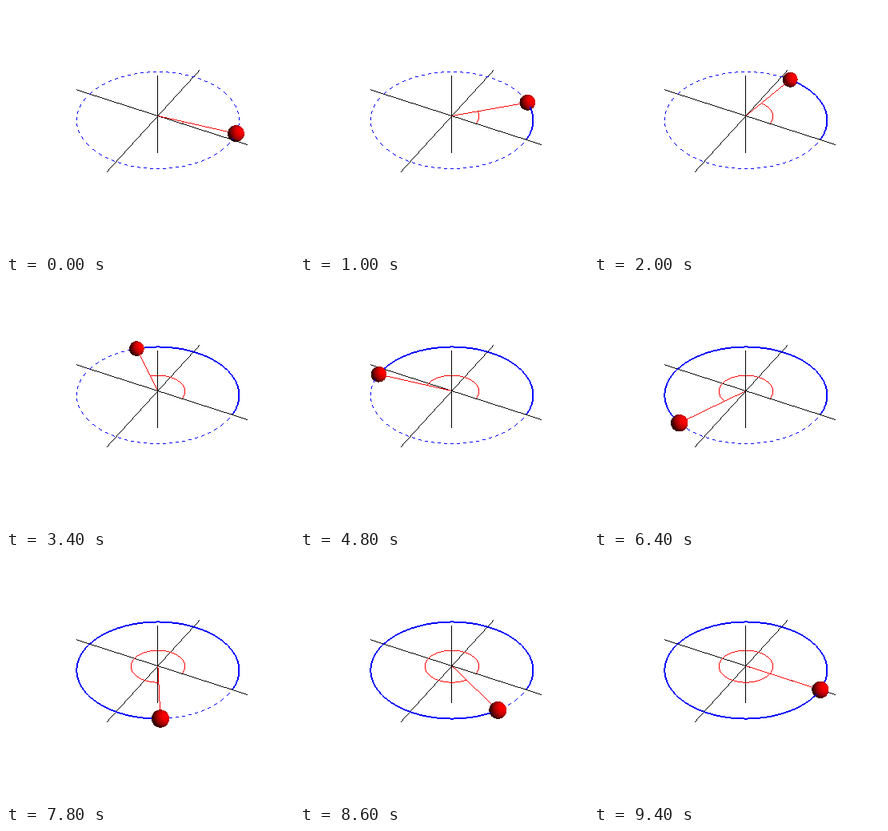
Write a matplotlib script that moves like this. It is 360 px wide and 309 px high and loops after 9.6 s.

```python
import numpy as np
import matplotlib.pyplot as plt
from matplotlib.animation import FuncAnimation

W, H, DPI = 360, 309, 100
STEPS, INTERVAL = 48, 200
BLACK, BLUE, RED = (0, 0, 0), (0, 0, 255), (255, 0, 0)

# Perspective camera; lengths are in units of the orbit radius.
CX, CY, SCALE = 189.4, 137.0, 101.1
AZIM = np.radians(28.4)
SIN_E, COS_E = 0.5936, 0.8048
PERSP = 0.113
CAMERA = np.array([0, 0, -1 / PERSP])
BALL_R = 0.1
LIGHT = np.array([0.58, 0.3, 0.757])
AMBIENT = 0.22
DASH, PERIOD = 4, 8


def view(x, y, z):
    """World point to (right, up, depth)."""
    right = x * np.cos(AZIM) + y * np.sin(AZIM)
    away = y * np.cos(AZIM) - x * np.sin(AZIM)
    return np.stack([right, away * SIN_E + z * COS_E,
                     away * COS_E - z * SIN_E], axis=-1)


def project(v):
    s = SCALE / (1 + PERSP * v[..., 2])
    return CX + s * v[..., 0], CY - s * v[..., 1]


def segment(a, b, n=2400):
    t = np.linspace(0, 1, n)[:, None]
    return view(*(np.array(a) * (1 - t) + np.array(b) * t).T)


def arc(radius, end, n=6000):
    t = np.linspace(0, end, int(n * end / (2 * np.pi)))
    return view(radius * np.cos(t), radius * np.sin(t), 0 * t)


def hidden(v, ball):
    """True where the ball blocks the sight line to a point."""
    d, f = v - CAMERA, CAMERA - ball
    a, b = (d * d).sum(-1), d @ f
    disc = b * b - a * (f @ f - BALL_R ** 2)
    return (disc > 0) & (-b - np.sqrt(np.maximum(disc, 0)) < a)


def stroke(canvas, path, color, ball, width=1, dashed=False):
    """Draw a crisp line: one step per pixel along its major direction."""
    x, y = project(path)
    flat = np.abs(np.diff(x)) >= np.abs(np.diff(y))
    major = np.where(flat, x[1:], y[1:])
    before = np.where(flat, x[:-1], y[:-1])
    minor = np.where(flat, y[1:], x[1:])
    cell = np.floor(np.maximum(major, before)).astype(int)
    keep = np.floor(major) != np.floor(before)
    if dashed:
        keep &= (np.cumsum(keep) - 1) % PERIOD < DASH
    keep &= ~hidden(path[1:], ball)
    first = np.round(minor - (width - 1) / 2).astype(int)
    for k in range(width):
        col = np.where(flat, cell, first + k)[keep]
        row = np.where(flat, first + k, cell)[keep]
        canvas[row, col] = color


def paint_ball(canvas, center):
    x, y = project(center)
    r = SCALE * BALL_R / (1 + PERSP * center[2])
    rows, cols = np.mgrid[:H, :W]
    nx, ny = (cols - x) / r, (y - rows) / r
    inside = nx ** 2 + ny ** 2 <= 1
    nx, ny = nx[inside], ny[inside]
    nz = np.sqrt(1 - nx ** 2 - ny ** 2)
    lit = np.maximum(0, np.stack([nx, ny, nz], -1) @ LIGHT)
    shade = 255 * (AMBIENT + (1 - AMBIENT) * lit)
    canvas[inside] = np.outer(np.clip(shade, 0, 255), [1, 0, 0])


fig = plt.figure(figsize=(W / DPI, H / DPI), dpi=DPI, facecolor="white")
ax = fig.add_axes([0, 0, 1, 1])
ax.axis("off")
picture = ax.imshow(np.full((H, W, 3), 255, np.uint8),
                    interpolation="nearest", aspect="auto")

ORIGIN = (0, 0, 0)
floor_axes = [segment((-1.2, 0, 0), (1.2, 0, 0)),
              segment((0, -1.2, 0), (0, 1.2, 0)),
              segment((0, 0, -0.6), ORIGIN)]
upper_axis = segment(ORIGIN, (0, 0, 0.6))
orbit = arc(1, 2 * np.pi)


def draw(i):
    angle = 2 * np.pi * (i + 1) / STEPS
    tip = (np.cos(angle), np.sin(angle), 0)
    ball = view(*tip)
    canvas = np.full((H, W, 3), 255, np.uint8)
    paint_ball(canvas, ball)
    for path in floor_axes:
        stroke(canvas, path, BLACK, ball)
    stroke(canvas, orbit, BLUE, ball, dashed=True)
    stroke(canvas, arc(1, angle), BLUE, ball, width=2)
    stroke(canvas, arc(1 / 3, angle), RED, ball)
    stroke(canvas, segment(ORIGIN, tip), RED, ball)
    # The upper half of the vertical axis stands in front of the orbit plane.
    stroke(canvas, upper_axis, BLACK, ball)
    picture.set_data(canvas)
    return [picture]


anim = FuncAnimation(fig, draw, frames=STEPS, interval=INTERVAL, repeat=True)
plt.show()
```
